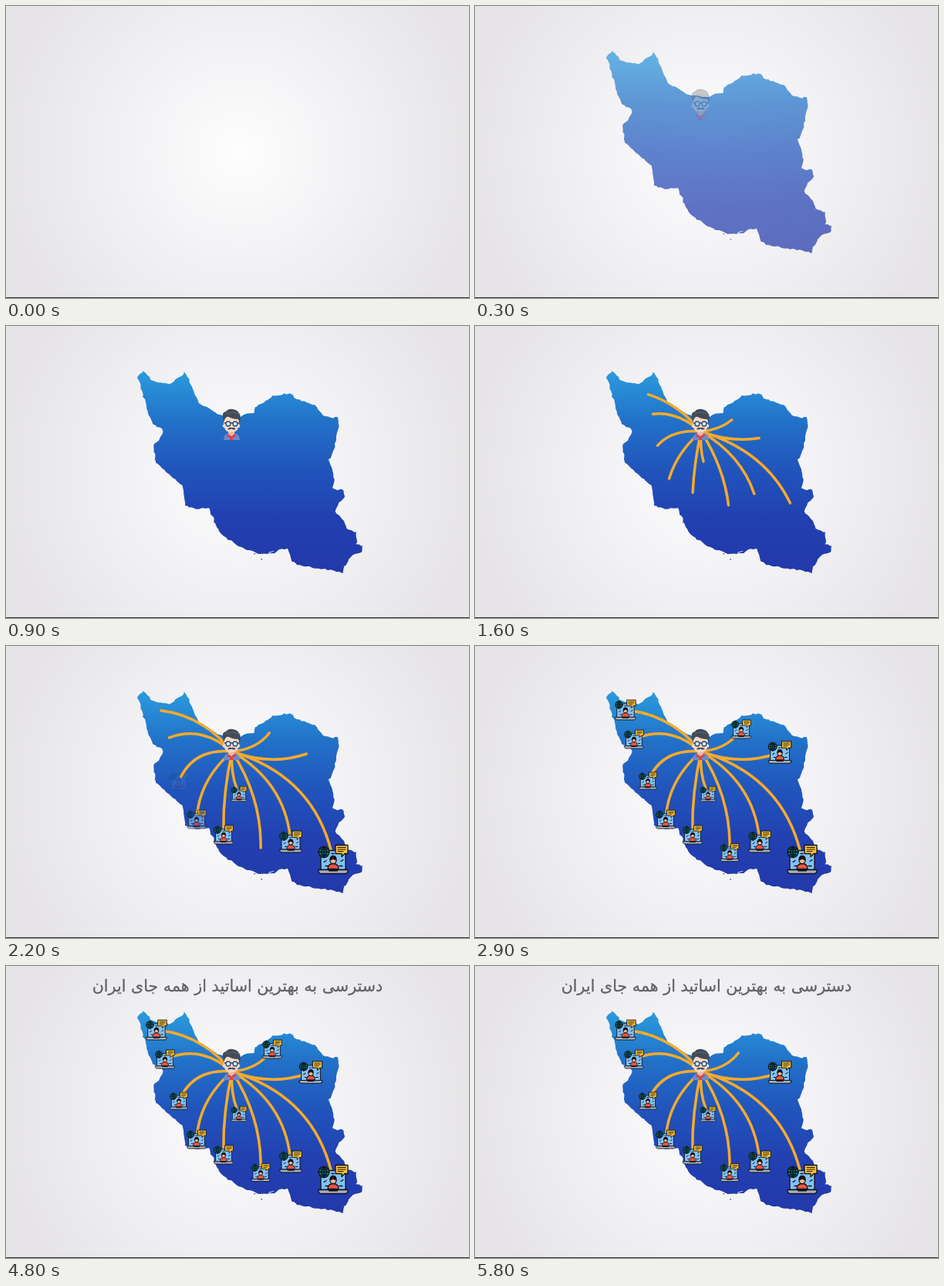
An HTML page for the animation above (8 s loop, 600 by 379 pixels).

```html
<!DOCTYPE html>
<html lang="fa">
<head>
<meta charset="utf-8">
<title>نقشه</title>
<style>
  html, body { margin: 0; width: 100%; height: 100%; overflow: hidden; }
  svg { display: block; width: 100%; height: 100%; }
  text {
    font-family: "DejaVu Sans", sans-serif; text-anchor: middle; direction: rtl;
    fill: #626266; stroke: #626266; stroke-width: .3;
  }
</style>
</head>
<body>
<svg viewBox="0 0 600 379" preserveAspectRatio="none">
  <defs>
    <radialGradient id="glow" gradientUnits="userSpaceOnUse" cx="303" cy="190" r="310">
      <stop offset="0" stop-color="#fdfdfe"/>
      <stop offset=".35" stop-color="#f5f4f6"/>
      <stop offset="1" stop-color="#e6e4e6"/>
    </radialGradient>
    <linearGradient id="blue" gradientUnits="userSpaceOnUse" x1="0" y1="58" x2="0" y2="320">
      <stop offset="0" stop-color="#2b9bdd"/>
      <stop offset=".25" stop-color="#2271c8"/>
      <stop offset=".5" stop-color="#2153bb"/>
      <stop offset=".75" stop-color="#223fb0"/>
      <stop offset="1" stop-color="#2339aa"/>
    </linearGradient>
    <g id="laptop" stroke="#10131c" stroke-width="1.3" stroke-linejoin="round" stroke-linecap="round">
      <rect x="4" y="8" width="32" height="25" rx="1.5" fill="#83c1f4"/>
      <path d="M8 23l3-2M10 28h3M30 22l3-2M28 28h4M18 12h3" fill="none"/>
      <path d="M13 32q0-7 7-7t7 7z" fill="#ee5340"/>
      <circle cx="20" cy="21" r="4" fill="#f3b98f"/>
      <path d="M16 20q0-5 4-5t4 5q-3 0-4-2-1 2-4 2z" fill="#10131c"/>
      <circle cx="8" cy="10" r="7" fill="#087a78"/>
      <path d="M1 10h14M8 3v14M8 3q-7 7 0 14M8 3q7 7 0 14M3 6q5 2 10 0M3 14q5-2 10 0" fill="none"/>
      <path d="M23 1h16v11h-4l-4 4v-4h-8z" fill="#fcc232"/>
      <path d="M26 4h10M26 6.500h10M26 9h7" stroke-width="1"/>
      <path d="M1 33h38v2q-1 3-3 3h-32q-2 0-3-3z" fill="#a9afba"/>
      <path d="M15 34h10" stroke-width="2"/>
    </g>
  </defs>

  <rect width="600" height="379" fill="url(#glow)"/>
  <g id="map" fill="url(#blue)">
    <path id="land"/>
    <path d="M321 295h2v2zM330 302h2v2zM340 295l14-5-6 5z"/>
  </g>
  <g id="routes" fill="none" stroke="#f6aa2c" stroke-width="3.5" stroke-linecap="round"></g>
  <g id="man">
    <path d="M282 148q0-8 7-9h7q7 1 7 9z" fill="#6a8cc8"/>
    <path d="M288 133h8v7l-4 4-4-4z" fill="#e9b9a2"/>
    <path d="M287 140l5 3 5-3 1 3-4 2v3h-4v-3l-4-2z" fill="#e0404a"/>
    <path d="M282 118h20v10q2 0 1 3l-2 1q-2 6-9 6t-9-6l-2-1q-1-3 1-3z" fill="#f8d8c6"/>
    <path d="M282 126l-1-9q-1-5 4-6 3-4 9-3 6 1 8 5 3 3 1 13l-2-5q-8 0-14-4-4 3-5 9z" fill="#424b58"/>
    <path d="M285 114q8-4 16 0" fill="none" stroke="#5a6574"/>
    <g fill="#d5eef8" stroke="#254b70" stroke-width="1.3">
      <circle cx="288" cy="127" r="3"/>
      <circle cx="297" cy="127" r="3"/>
      <path d="M291 126h3M283 126h2M300 126h2"/>
    </g>
    <path d="M287 134q2-3 5-2 4-1 6 2-3 1-6-.5-3 1.500-5 .5z" fill="#424b58"/>
  </g>
  <g id="icons"></g>
  <text id="title" x="300" y="33" font-size="20">دسترسی به بهترین اساتید از همه جای ایران</text>
  <rect y="378" width="600" height="1" fill="#2f2f31"/>
</svg>
<script>
const LOOP = 8000, STEP = 100, TITLE_WIDTH = 377;
const hub = { x: 293, y: 137 };
const byId = id => document.getElementById(id);
const ramp = (t, from, to) => Math.min(1, Math.max(0, (t - from) / (to - from)));

function add(parent, tag, attributes) {
  const node = document.createElementNS(parent.namespaceURI, tag);
  for (const name in attributes) node.setAttribute(name, attributes[name]);
  return parent.appendChild(node);
}

// Key corners of the border; the coastline between them is roughened by rule.
const corners = `171,66 178,58 190,72 214,75 232,60 244,86 249,100 281,117 303,117 321,113
  322,106 346,91 368,87 373,93 400,103 413,118 430,119 431,130 427,152 419,174
  425,192 424,211 438,213 439,221 426,240 438,253 441,262 454,268 454,284 462,285
  460,294 446,299 436,320 377,310 370,306 364,288 331,297 304,287 279,271 262,237
  243,237 232,232 228,207 194,177 191,156 204,140 203,133 191,128 183,111`
  .trim().split(/\s+/).map(pair => pair.split(",").map(Number));

function raggedPath(points) {
  let seed = 7;
  const jitter = () => ((seed = seed * 16807 % 2147483647) / 2147483647 - .5) * 2.4;
  const outline = points.flatMap(([x, y], i) => {
    const [nextX, nextY] = points[(i + 1) % points.length];
    const parts = Math.ceil(Math.hypot(nextX - x, nextY - y) / 4);
    return Array.from({ length: parts }, (_, k) => [
      x + (nextX - x) * k / parts + jitter(),
      y + (nextY - y) * k / parts + jitter()
    ]);
  });
  return "M" + outline.join("L") + "Z";
}
byId("land").setAttribute("d", raggedPath(corners));

// An arc from the hub, bowed sideways by bend and stopping short of the icon's centre.
function arc({ x, y, bend }) {
  const dx = x - hub.x, dy = y - hub.y;
  const bowX = hub.x + dx / 2 + dy * bend, bowY = hub.y + dy / 2 - dx * bend;
  const keep = 1 - 6 / Math.hypot(x - bowX, y - bowY);
  return `M${hub.x} ${hub.y}Q${bowX} ${bowY} ${bowX + (x - bowX) * keep} ${bowY + (y - bowY) * keep}`;
}

// Laptops in order of appearance.
const laptops = [
  { x: 424, y: 277, size: 40, bend: .29 },
  { x: 369, y: 254, size: 30, bend: .25 },
  { x: 282, y: 245, size: 26, bend: -.06 },
  { x: 302, y: 192, size: 21, bend: -.12 },
  { x: 247, y: 225, size: 26, bend: -.2 },
  { x: 224, y: 175, size: 24, bend: -.34 },
  { x: 330, y: 268, size: 25, bend: .15 },
  { x: 206, y: 121, size: 26, bend: -.3 },
  { x: 195, y: 83, size: 28, bend: -.2 },
  { x: 345, y: 108, size: 26, bend: -.22, leaves: 5600 },
  { x: 395, y: 138, size: 31, bend: -.18 }
];
laptops.forEach((laptop, i) => {
  const { x, y, size } = laptop;
  laptop.enters = 1650 + i * 105;
  laptop.route = add(byId("routes"), "path", { d: arc(laptop), pathLength: 1, "stroke-dasharray": "1 2" });
  laptop.icon = add(byId("icons"), "use", {
    href: "#laptop", transform: `translate(${x} ${y}) scale(${size / 40}) translate(-20 -19.5)`
  });
});

const title = byId("title");
title.setAttribute("font-size", 20 * TITLE_WIDTH / title.getComputedTextLength());

function draw(t) {
  byId("map").style.opacity = ramp(t, 0, 420);
  byId("man").style.opacity = ramp(t, 100, 800);
  const grown = ramp(t, 900, 1800);
  byId("routes").style.opacity = grown > 0 ? 1 : 0;
  for (const { route, icon, enters, leaves = LOOP } of laptops) {
    route.style.strokeDashoffset = 1 - grown;
    icon.style.opacity = ramp(t, enters, enters + 200) - ramp(t, leaves, leaves + 200);
  }
  title.style.opacity = ramp(t, 3700, 4000);
}

const began = performance.now();
function tick() {
  const elapsed = (performance.now() - began) % LOOP;
  draw(Math.floor(elapsed / STEP) * STEP);
  requestAnimationFrame(tick);
}
tick();
</script>
</body>
</html>
```
